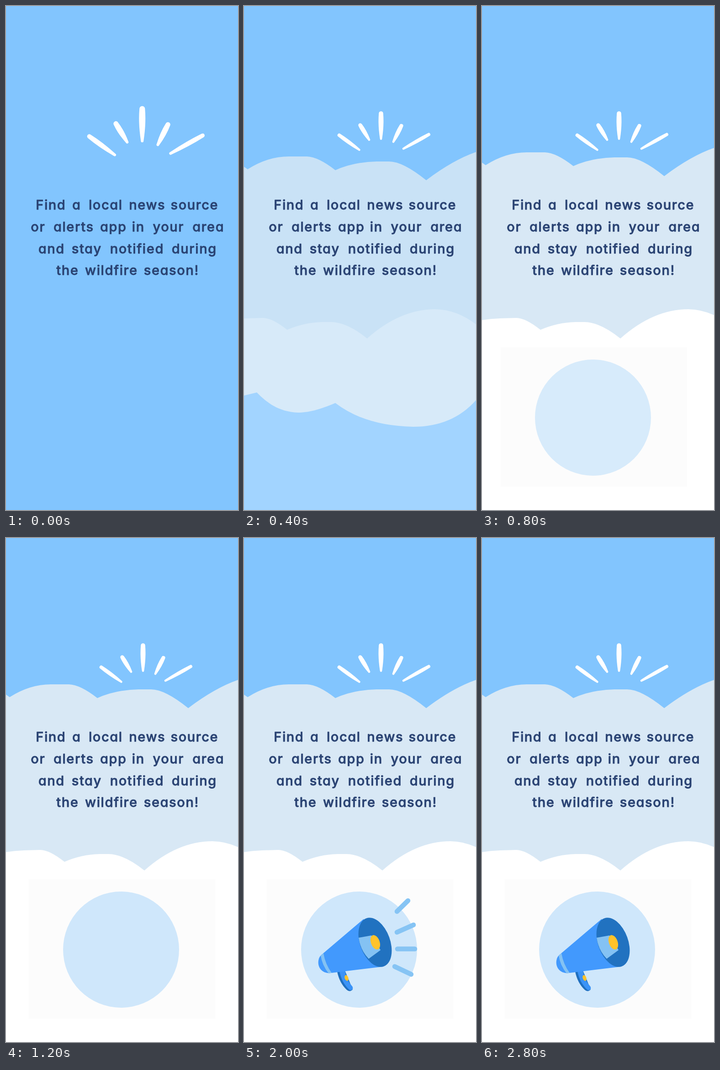
These frames come from a looping animation (508x1102 px, 3 s). An HTML page:

```html
<!DOCTYPE html>
<html lang="en">
<head>
<meta charset="utf-8">
<title>Stay notified</title>
<style>
  html, body { margin: 0; width: 100%; height: 100%; overflow: hidden; background: #82c5fe; }
  svg { display: block; width: 100vw; height: 100vh; }
  #copy {
    font: 500 29px Inter, "Open Sans", sans-serif;
    font-feature-settings: "cv11";
    letter-spacing: 1.6px;
    text-anchor: middle;
    fill: #2a4373;
    stroke: #2a4373;
    stroke-width: .8;
    stroke-linejoin: round;
  }
  #waves { stroke: #86c4f4; stroke-width: 10.5; stroke-linecap: round; }
</style>
</head>
<body>
<svg viewBox="0 0 508 1102" preserveAspectRatio="none">
  <rect width="508" height="1102" fill="#82c5fe"/>
  <path id="back" fill="#d8e8f5" d="M-5 339L8 348Q52 320 98 320H138Q163 321 200 350Q240 332 290 331H318Q348 331 399 372Q460 326 512 309V848Q460 911 370 911Q265 909 200 859C165 874 140 880 118 880C75 878 50 858 28 836L-5 844Z"/>
  <path id="front" fill="#fff" d="M-60 700Q-10 685 40 683L75 682Q95 682 128 708Q165 692 205 691H225Q260 692 303 727Q375 663 452 663Q510 664 560 712V1110H-60Z"/>
  <g id="card">
    <rect x="50" y="746" width="408" height="305" fill="#fcfcfc"/>
    <circle cx="252" cy="900" r="127" fill="#cfe7fb"/>
    <g id="horn">
      <path fill="#1f6fbf" d="M204 948Q209 973 225 988Q232 994 238 987L221 946Z"/>
      <path fill="#3b93f7" d="M209 947Q214 973 231 988Q236 990 238 986Q239 982 236 979Q224 967 221 946Z"/>
      <ellipse cx="224.500" cy="962" rx="3.900" ry="6.500" fill="#ffc32b" transform="rotate(-20 224.500 962)"/>
      <path fill="#4299fd" d="M170 911L262 833L287 884L306 937L187 951.500C168 951 161 936 163 924Q164 916 170 911Z"/>
      <path fill="#84c2f3" d="M168 913L174 908Q178 932 192 951L185 951.500Q171 934 168 913Z"/>
      <ellipse cx="287" cy="884" rx="33" ry="56" fill="#2172c0" transform="rotate(-20 287 884)"/>
      <path fill="#84c2f3" d="M251 874L279 869L299 901L273 920Q255 902 251 874Z"/>
      <ellipse cx="287.500" cy="884" rx="9.500" ry="16.500" fill="#ffc32b" transform="rotate(-20 287.500 884)"/>
    </g>
    <g id="waves"></g>
  </g>
  <g id="rays" fill="#fff"></g>
  <g id="copy"></g>
</svg>
<script>
const $ = id => document.getElementById(id);

function add(parent, tag, attrs, text = "") {
  const el = document.createElementNS("http://www.w3.org/2000/svg", tag);
  for (const k in attrs) el.setAttribute(k, attrs[k]);
  el.textContent = text;
  return parent.appendChild(el);
}

// Each line: baseline, then words with their centres.
const lines = [
  [445, "Find", 97.5, "a", 154, "local", 217.5, "news", 308.5, "source", 412],
  [493, "or", 69.5, "alerts", 147.5, "app", 234.5, "in", 289, "your", 355, "area", 442.5],
  [541, "and", 99, "stay", 176, "notified", 286, "during", 411.5],
  [588, "the", 134, "wildfire", 230, "season!", 361.5]
];
for (const [y, ...words] of lines) {
  for (let i = 0; i < words.length; i += 2) add($("copy"), "text", { x: words[i + 1] + .8, y }, words[i]);
}

// Tapered stroke: round outer end of radius r, thin inner end.
function ray(x1, y1, r, x2, y2, s = 2.3) {
  const len = Math.hypot(x2 - x1, y2 - y1);
  const ux = (x2 - x1) / len, uy = (y2 - y1) / len;
  const at = (d, w) => `${x1 + ux * d - uy * w} ${y1 + uy * d + ux * w}`;
  const b = r * 1.45, m = len * .45;
  add($("rays"), "path", {
    d: `M${at(0, r)}A${r} ${r} 0 0 1 ${at(0, -r)}Q${at(m, -b)} ${at(len, -s)}` +
       `A${s} ${s} 0 0 1 ${at(len, s)}Q${at(m, b)} ${at(0, r)}Z`
  });
}
ray(208.5, 282.5, 3.8, 252.5, 314.5);
ray(254.5, 260.5, 4.2, 274, 292.5);
ray(300, 235, 4.8, 300, 290.5);
ray(344.5, 262, 4.1, 327, 297);
ray(404.5, 281, 3.5, 349, 312);

const waves = [
  [335, 816.5, 359, 793],
  [335, 862, 371, 846],
  [336, 898.5, 374, 898.5],
  [330, 937, 366, 954]
].map(pos => ({ pos, el: add($("waves"), "line", {}) }));

const STEP = 200, LOOP = 3000;
const rayScale = [1.266, 1.015];
const slide = [33.5, 9];
// Horn poses: step -> [angle, scale], at rest otherwise.
const hornPose = { 3: [-15, 1], 7: [-4, 1.04], 8: [2, 1] };
// Sound waves: step -> [start, end, first visible wave].
const wavePose = { 9: [0, .9, 0], 10: [0, 1, 0], 11: [.7, 1.5, 1] };

function enter(id, k, alphas, dx, dy) {
  const el = $(id), d = slide[k] || 0;
  el.setAttribute("opacity", k < 0 ? 0 : alphas[k] ?? 1);
  el.setAttribute("transform", `translate(${dx * d} ${dy * d})`);
}

function draw(n) {
  const s = rayScale[n] || 1;
  $("rays").setAttribute("transform", `translate(306.5 273) scale(${s}) translate(-306.5 -273)`);

  enter("back", n - 1, [.27, .83], 0, 1);
  enter("front", n - 2, [.26, .78], -1, 0);
  enter("card", n - 3, [.35, .83], -1, 0);

  const [angle, size] = hornPose[n] || [0, 1];
  $("horn").setAttribute("visibility", n === 3 || n >= 7 ? "visible" : "hidden");
  $("horn").setAttribute("transform",
    `rotate(${angle} 254 1018) translate(243 911) scale(${size}) translate(-243 -911)`);

  const [a, b, first] = wavePose[n] || [0, 0, 9];
  waves.forEach(({ pos: [x1, y1, x2, y2], el }, i) => {
    const set = (k, v) => el.setAttribute(k, v);
    set("visibility", i >= first ? "visible" : "hidden");
    set("x1", x1 + (x2 - x1) * a);
    set("y1", y1 + (y2 - y1) * a);
    set("x2", x1 + (x2 - x1) * b);
    set("y2", y1 + (y2 - y1) * b);
  });
}

const start = performance.now();
let shown = -1;
function tick() {
  const n = Math.floor((performance.now() - start) % LOOP / STEP);
  if (n !== shown) draw(shown = n);
  requestAnimationFrame(tick);
}
tick();
</script>
</body>
</html>
```
